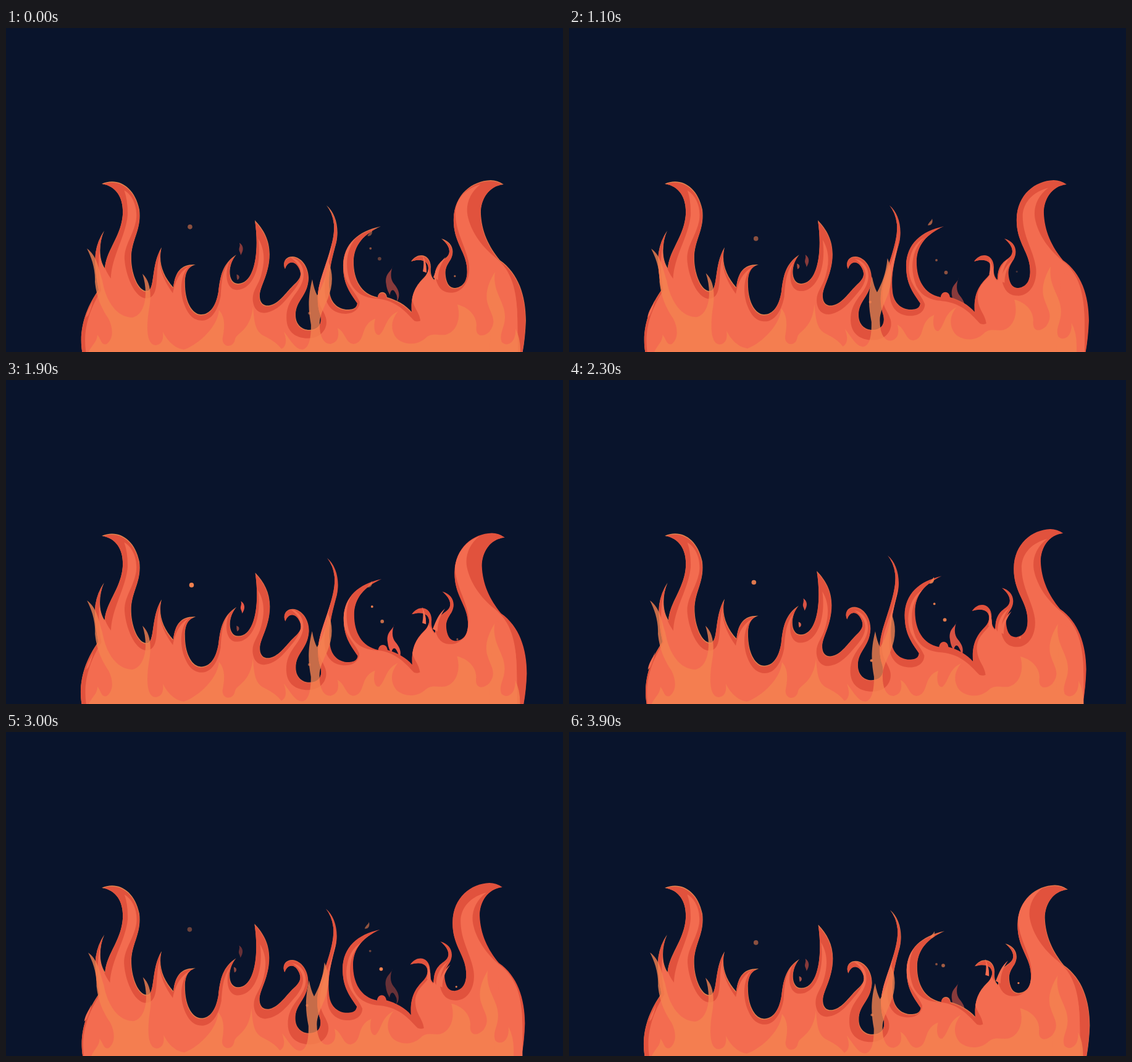
Recreate the animation shown at these times as an HTML page with a canvas. Size 902 by 526 pixels, loop 4000 ms.

```html
<!DOCTYPE html>
<html lang="en">
<head>
<meta charset="utf-8">
<title>Flames</title>
<style>
html, body { margin: 0; width: 100%; height: 100%; overflow: hidden; background: #09142c; }
canvas { display: block; }
</style>
</head>
<body>
<canvas id="stage" width="902" height="526"></canvas>
<script>
const ctx = document.getElementById('stage').getContext('2d');
const LOOP = 4000, STEP = 100;
const NIGHT = '#09142c', DARK = '#e1523d', MID = '#f36c50', FRONT = '#f58350';
const shape = (...parts) => new Path2D(parts.join(''));

const outer = shape(
  'M126 560L124 530C116 490 130 453 150 425C146 405 143 385 145 365Q148 345 159 329C150 350 150 375 160 390',
  'C162 365 178 348 186 320S188 258 155 253C180 242 208 256 216 295C220 330 201 345 203 378C204 400 214 427 228 427S234 385 252 356',
  'C246 380 254 402 271 421C274 395 284 383 307 384C292 388 289 402 290 420C291 446 302 465 316 465S340 452 344 428C347 402 351 382 373 368C358 385 359 415 376 415C402 415 411 365 403 312',
  'C420 330 430 350 426 380C422 408 410 422 411 437C412 449 420 452 428 450C442 447 453 430 464 419C476 408 480 402 475 391C468 376 456 378 452 391C448 384 450 371 464 371C480 372 491 390 490 408C488 436 469 442 469 466C469 482 480 490 491 490C508 490 512 478 509 466C504 452 503 434 508 415C516 385 534 345 531 318Q529 300 519 288',
  'C534 300 540 325 535 348C527 378 521 400 524 428C526 448 540 457 553 457S568 452 569 447C556 428 546 415 546 385C547 350 570 330 607 322C580 334 563 352 563 380C563 408 575 432 602 437C603 426 616 426 617 437C632 441 648 450 657 461',
  'C655 432 664 418 677 405C690 392 686 370 656 379C668 362 688 368 688 388C687 400 690 406 694 409C694 390 700 382 710 375C724 366 718 352 705 342C722 346 728 362 720 376C712 388 710 394 713 408C716 420 722 422 728 422',
  'C744 420 749 405 746 385C743 362 724 345 725 310C726 270 755 248 785 247Q796 247 806 254C782 256 769 278 769 300C770 330 782 355 800 377C830 398 842 435 842 475Q841 505 836 530L832 560Z'
);

const inner = shape(
  'M128 560L126 530C119 490 133 455 152 426Q144 380 153 346C150 370 156 390 168 407',
  'C170 370 193 340 197 305Q198 282 192 264C206 272 214 292 211 312C206 338 191 352 191 375C192 400 206 440 227 440C250 438 240 400 249 370',
  'C247 395 258 415 270 432C275 408 284 396 298 388C284 400 281 425 287 446C294 468 304 477 318 477S344 462 349 437C351 410 353 395 365 380C355 398 357 428 376 428C402 428 418 390 412 345',
  'C424 365 422 385 416 405C411 422 400 430 402 447C404 462 413 466 421 466C442 464 455 447 468 432C486 412 488 392 464 376C484 380 490 400 484 416C477 436 457 445 457 475C457 498 473 508 493 508C516 508 526 490 522 475C517 458 506 454 510 425C515 395 535 365 534 335',
  'C537 370 518 405 521 436C523 460 538 469 555 469C570 469 578 460 578 450C570 430 552 420 552 390Q554 355 578 342C555 362 554 395 564 420C574 440 592 444 606 445C640 448 656 470 668 482Q674 484 678 482',
  'C676 465 664 460 664 437C666 410 694 408 689 380Q690 400 698 412C698 394 706 382 717 374C705 390 703 405 705 417C710 434 720 437 731 437',
  'C752 436 762 412 759 390C755 362 737 340 738 305C740 284 756 268 780 262C762 275 755 294 758 312C763 338 780 362 802 380C830 402 838 435 838 480V560Z'
);

// Bits of the inner fire that may reach past the outer one
const stray = shape(
  'M126 470C128 458 134 452 138 442Q135 456 130 466Z',
  'M683 402Q686 388 683 376Q690 388 689 404Z',
  'M700 412C706 398 710 388 721 379C712 392 708 402 708 416Z',
  'M800 400C830 404 838 440 838 480V560H790Z'
);

const glow = shape(
  'M132 560V530C138 514 147 512 148 498C154 505 154 516 163 513C174 505 174 488 166 472C150 448 146 430 144 412C145 390 138 372 131 358C148 370 150 392 156 410C162 445 180 470 205 470C226 465 231 430 221 399',
  'C235 412 236 435 231 460C226 495 230 515 243 515C254 513 255 504 254 493C260 506 272 520 288 522C304 518 342 490 345 458C354 468 355 482 351 502C348 518 368 522 371 505C374 494 396 492 400 452C402 480 404 494 420 501Q438 510 446 521Q458 515 450 493',
  'C460 505 468 522 480 522C492 520 494 500 494 482C490 460 488 440 496 408Q499 425 504 434C512 420 519 405 522 379C531 400 529 420 521 440C513 458 507 470 508 482C508 500 514 513 526 513C538 510 540 500 537 487',
  'C550 494 550 512 563 513C584 510 572 482 598 472C594 488 598 500 605 498C616 488 614 470 635 460C622 476 623 492 633 504C645 515 666 516 680 503C690 494 700 500 712 498C728 494 738 474 731 449',
  'C748 453 762 466 762 483C759 503 774 502 783 493C796 476 786 466 781 450C775 434 780 415 792 396C787 430 810 445 808 472C807 488 798 497 803 510C812 519 827 510 825 488Q834 504 833 530V560Z'
);

const bigLeaf = shape('M0 0C-2 10 -14 12 -11 30C-10 40 -6 45 -5 48C-4 40 0 36 4 44Q9 52 5 60C14 50 9 38 2 30C-5 22 -4 10 0 0Z');
const leaf = shape('M-2 -10C5 -5 5 2 0 10C-1 4 -4 3 -2 -3Q-1 -6 -2 -10Z');
const drop = shape('M-2 -5C4 -4 3 3 -1 4Q-2 0 -2 -5Z');
const sliver = shape('M3 -6C5 2 1 5 -4 5C-3 0 1 -1 3 -6Z');
const dot = r => { const p = new Path2D(); p.arc(0, 0, r, 0, 7); return p; };

// Position at birth, drift in px per second, birth time, repeat period, life
const group = (start, period, life, list) => list.map(([path, color, x, y, vx, vy]) =>
  ({ path, color, x, y, vx, vy, start, period, life }));
const behind = group(1000, 2800, 2800, [[bigLeaf, '#ee5a47', 631.5, 406, -2.7, -11.2]]);
const sparks = [
  ...group(1000, 2800, 2800, [
    [dot(3.8), FRONT, 303, 343, -2.8, -11.2],
    [leaf, '#ee5a47', 385, 379, -2.7, -11.2],
    [dot(1.9), FRONT, 595.3, 378, -2.8, -11.2]
  ]),
  ...group(0, 1840, 1840, [
    [drop, MID, 375.5, 405, -4, -16],
    [sliver, FRONT, 589.5, 333, -4, -16],
    [dot(2.2), FRONT, 491.3, 463, -3.2, -16.5]
  ]),
  ...group(900, 4600, 5100, [[dot(2.9), FRONT, 610.8, 398.3, -1.6, -6.4]]),
  ...group(1700, 4600, 5100, [[dot(1.6), FRONT, 731.2, 422.3, -1.5, -6.7]])
];

const wave = (t, peak, period = 2000) => Math.cos(2 * Math.PI * (t - peak) / period);
const smooth = u => u * u * (3 - 2 * u);

// Sway around the tip of the left flame
function sway(k, squeeze, turn, dx = 0, dy = 0) {
  const s = squeeze * k, r = turn * k;
  ctx.setTransform(1 - s, -r, r, 1, 155 * s - 250 * r + dx, 155 * r + dy);
}

function drawSpark(t, s) {
  const age = (t - s.start + s.period) % s.period, f = age / s.life;
  ctx.globalAlpha = Math.max(0, Math.min(0.5 + f * 1.5, (0.92 - f) * 2, 1));
  ctx.setTransform(1, 0, 0, 1, s.x + s.vx * age / 1000, s.y + s.vy * age / 1000);
  ctx.fillStyle = s.color;
  ctx.fill(s.path);
  ctx.globalAlpha = 1;
}

function rimColor(t) {
  const a = 0.8 * Math.max(0, wave(t, 200, LOOP));
  const g = ctx.createLinearGradient(300, 0, 560, 0);
  g.addColorStop(0, '#e0834f');
  g.addColorStop(1, `rgb(${225 - a},${82 + 48 * a},${61 + 18 * a})`);
  return g;
}

function draw(t) {
  ctx.setTransform(1, 0, 0, 1, 0, 0);
  ctx.fillStyle = NIGHT;
  ctx.fillRect(0, 0, 902, 526);
  behind.forEach(s => drawSpark(t, s));

  const k = 0.15 + 0.85 * wave(t, 550);
  const kInner = 0.5 + 0.5 * wave(t, 1750);
  ctx.save();
  sway(k, 0.012, 0.0107);
  ctx.fillStyle = rimColor(t);
  ctx.fill(outer);
  ctx.clip(outer);
  sway(k, 0.012, 0.0107, -0.5, 1.5);
  ctx.fillStyle = DARK;
  ctx.fill(outer);
  ctx.clip(outer);
  sway(kInner, 0.022, 0.015);
  ctx.fillStyle = MID;
  ctx.fill(inner);
  ctx.restore();

  sway(kInner, 0.022, 0.015);
  ctx.fillStyle = MID;
  ctx.fill(stray);

  sway(smooth(0.5 + 0.5 * wave(t, 1150)), 0.022, 0.014);
  ctx.globalAlpha = 0.8;
  ctx.fillStyle = FRONT;
  ctx.fill(glow);
  ctx.globalAlpha = 1;
  sparks.forEach(s => drawSpark(t, s));
}

const begin = performance.now();
function tick() {
  const t = (performance.now() - begin) % LOOP;
  draw(Math.floor(t / STEP) * STEP);
  requestAnimationFrame(tick);
}
tick();
</script>
</body>
</html>
```
